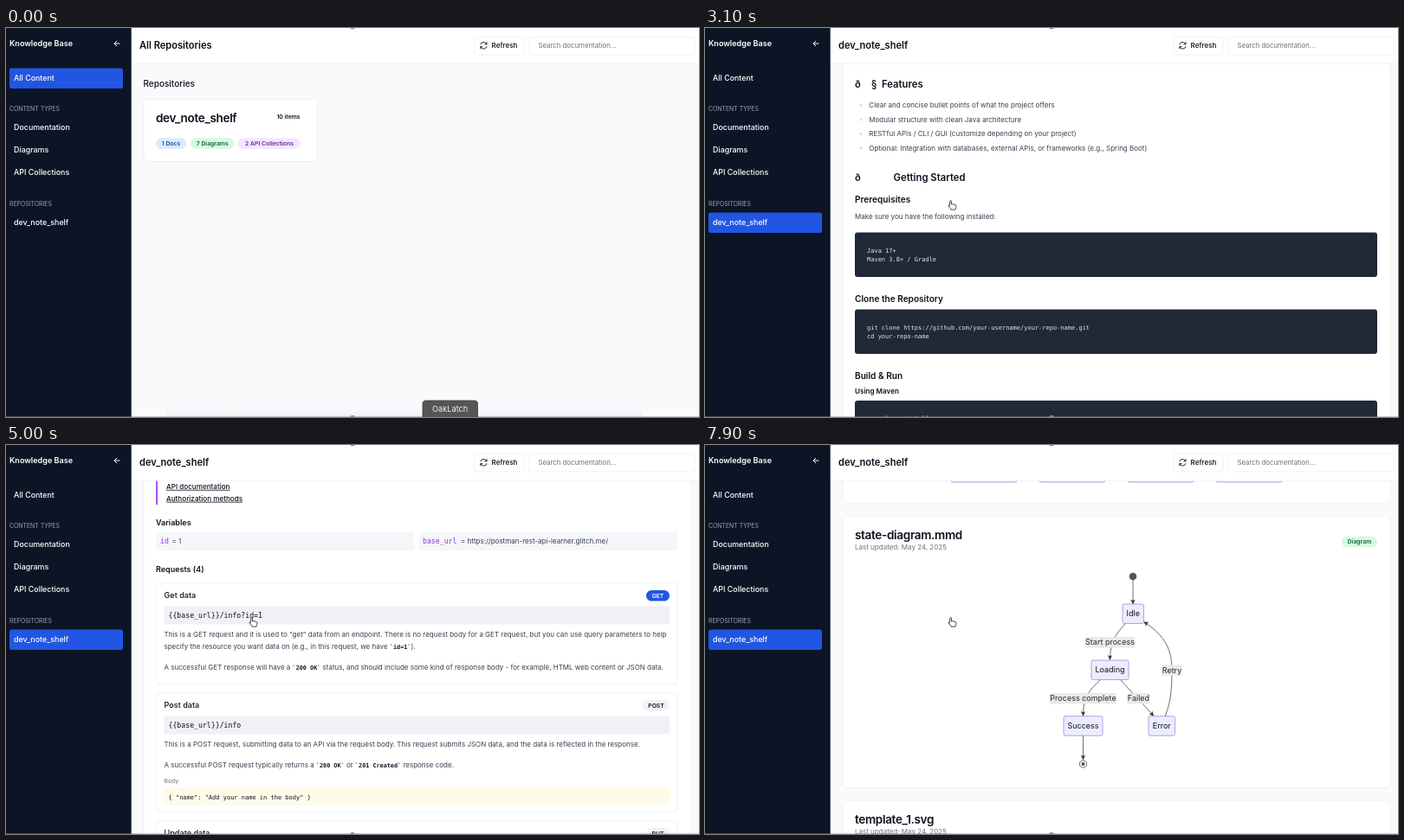
These frames come from a looping animation (800 px wide and 450 px high, 8000 ms). An HTML page:

```html
<!DOCTYPE html>
<html lang="en">
<head>
<meta charset="utf-8">
<title>Knowledge Base</title>
<style>
html, body { margin: 0; width: 100%; height: 100%; overflow: hidden; background: #f9fafb; }
svg { display: block; width: 800px; height: 450px; }
text { font-family: Inter, "Open Sans", sans-serif; }
.m, .c { font-family: "DejaVu Sans Mono", monospace; }
.c { font-size: 6.8px; font-weight: 700; fill: #111827; }
.edge { fill: none; stroke: #4a4a4a; stroke-width: .8; marker-end: url(#tip); }
</style>
</head>
<body>
<svg id="stage" viewBox="0 0 800 450" xmlns="http://www.w3.org/2000/svg">
  <defs>
    <marker id="tip" viewBox="0 0 6 6" refX="5.5" refY="3" markerWidth="6" markerHeight="6" markerUnits="userSpaceOnUse" orient="auto">
      <path d="M0 .4L6 3L0 5.6L1.4 3Z" fill="#333"/>
    </marker>
    <linearGradient id="glow" x2="0" y2="1">
      <stop offset="0" stop-color="#eceff4" stop-opacity="0"/>
      <stop offset="1" stop-color="#eceff4"/>
    </linearGradient>
  </defs>
  <rect width="800" height="450" fill="#f9fafb"/>
  <g id="shell">
    <g id="home"></g>
    <g id="page"></g>
    <g id="chrome"></g>
  </g>
  <g id="handles" fill="#8a8a8a">
    <ellipse cx="400" cy="0" rx="2.6" ry="1.2"/>
    <ellipse cx="400" cy="450" rx="2.6" ry="2"/>
    <rect y="449.3" width="800" height=".7" opacity=".6"/>
  </g>
  <g id="tooltip">
    <rect x="481" y="431" width="63.5" height="24" rx="3.5" fill="#555" stroke="#3e3e3e" stroke-width=".8"/>
    <text x="512.7" y="443.6" font-size="9.2" fill="#f0f0f0" text-anchor="middle">OakLatch</text>
  </g>
  <path id="arrow" d="M0 0V9.6L2.2 7.6L3.7 11L5.2 10.3L3.8 7.1H6.7Z" fill="#000" stroke="#fff" stroke-width=".7"/>
  <path id="hand" d="M.2 1.2C.2 -.3 2 -.3 2 1.2V4.4C2.4 3.6 3.8 3.8 3.9 4.7C4.4 4 5.6 4.3 5.6 5.1C6.3 4.6 7.3 5 7.3 6V8C7.3 9 6.6 9.4 6.5 10.6H1.6C1.3 9.2 -.6 7.8 -1.3 6.5C-1.8 5.4 -.6 4.9 .2 6Z" fill="#fff" stroke="#1a1a1a" stroke-width=".8" stroke-linejoin="round"/>
</svg>
<script>
const $ = id => document.getElementById(id);
const INK = '#0c111d', SOFT = '#374151', MUTED = '#6b7280', LINE = '#eceef1', PAPER = '#fff';
const NAVY = '#0c1526', ACCENT = '#2256e2', FIELD = '#eff1f4', VIOLET = '#9333ea';
const DOCS = ['#dbeafe', '#1e40af'], GRAPH = ['#d6fae2', '#166534'], API = ['#f3e8ff', '#6b21a8'];
const REPO = 'dev_note_shelf', STAMP = 'Last updated: May 24, 2025';

let out = '', top0 = 0;
const add = s => { out += s; };
const flush = id => { $(id).innerHTML = out; out = ''; top0 = 0; };

// y is the middle of the capitals
const text = (x, y, s, size = 8, fill = SOFT, weight = 400, more = '') =>
  add(`<text x="${x}" y="${y + top0 + size * .36}" font-size="${size}" fill="${fill}" font-weight="${weight}" ${more}>${s}</text>`);
const mono = (x, y, s, size = 7, fill = '#e5e7eb') => text(x, y, s, size, fill, 400, 'class="m"');
const box = (x, y, w, h, fill, r = 3, stroke = 'none') =>
  add(`<rect x="${x}" y="${y + top0}" width="${w}" height="${h}" rx="${r}" fill="${fill}" stroke="${stroke}" stroke-width=".8"/>`);
const dot = (x, y, r, fill, stroke = 'none') =>
  add(`<circle cx="${x}" cy="${y + top0}" r="${r}" fill="${fill}" stroke="${stroke}" stroke-width=".8"/>`);
const path = (d, attrs) => add(`<path d="${d}" transform="translate(0 ${top0})" ${attrs}/>`);
const pill = (x, y, w, s, [fill, ink]) => {
  box(x, y - 6.3, w, 12.6, fill, 6.3);
  text(x + w / 2, y, s, 6.8, ink, 600, 'text-anchor="middle"');
};
const bigTitle = (x, y, s) => text(x, y, s, 13.55, INK, 600, 'letter-spacing="-.34"');
const h2 = (y, ...parts) => parts.forEach(([x, s]) => text(x, y, s, 11.3, INK, 600));
const h3 = (y, s) => text(173, y, s, 10.1, INK, 600);
const h4 = (y, s) => text(173, y, s, 8.1, INK, 600);
const card = (y, h, title) => {
  box(159, y, 632, h, PAPER, 5, LINE);
  bigTitle(173, y + 22, title);
  text(173, y + 36.5, STAMP, 8, MUTED);
};
const code = (y, h, ...lines) => {
  box(173, y, 603, h, '#1f2937');
  lines.forEach((s, i) => mono(187, y + 20.5 + i * 10.6, s));
};
const list = (y, ...items) => items.forEach((s, i) => {
  dot(180, y + i * 16.4, 1, 'none', '#c3c8d0');
  text(189.3, y + i * 16.4, s);
});

function drawHome() {
  text(158.5, 64, 'Repositories', 10, INK, 500);
  add('<g id="tile">');
  box(159, 82.5, 200.5, 72, PAPER, 5, LINE);
  bigTitle(173, 104, REPO);
  text(326, 103, '10 items', 6.8, INK, 600, 'text-anchor="middle"');
  pill(173, 133.5, 35, '1 Docs', DOCS);
  pill(213, 133.5, 50.5, '7 Diagrams', GRAPH);
  pill(268, 133.5, 72, '2 API Collections', API);
  add('</g><rect x="185" y="440" width="550" height="10" fill="url(#glow)"/>');
  flush('home');
}

function drawReadme() {
  box(159, 49, 632, 1144, PAPER, 5, LINE);
  bigTitle(173, 71, 'README.md');
  text(173, 85.5, STAMP, 8, MUTED);
  pill(717, 79, 59, 'Documentation', DOCS);
  text(173, 126, 'Project Name', 13.55, INK, 700);
  text(173, 152, 'A short description of the project and the problem it solves.');

  top0 = 140;
  h2(65, [173, 'ð'], [192, '§'], [204, 'Features']);
  list(89.5, 'Clear and concise bullet points of what the project offers',
    'Modular structure with clean Java architecture',
    'RESTful APIs / CLI / GUI (customize depending on your project)',
    'Optional: Integration with databases, external APIs, or frameworks (e.g., Spring Boot)');
  h2(172.5, [173, 'ð'], [217.5, 'Getting Started']);
  h3(198.5, 'Prerequisites');
  text(173, 218, 'Make sure you have the following installed:');
  code(236.5, 51.5, 'Java 17+', 'Maven 3.8+ / Gradle');
  h3(313, 'Clone the Repository');
  code(325.5, 51.5, 'git clone https://github.com/your-username/your-repo-name.git', 'cd your-repo-name');
  h3(402, 'Build &amp; Run');
  h4(420.5, 'Using Maven');
  code(431, 51.5, 'mvn clean install', 'mvn spring-boot:run');

  top0 = 593;
  h4(48, 'Using Gradle');
  code(58.5, 51, './gradlew build', './gradlew bootRun');
  h2(137, [173, 'ð'], [192, '§ª'], [206, 'Running Tests']);
  code(154.5, 62, 'mvn test', '# or', './gradlew test');
  h2(244, [173, 'ð'], [214, 'ï¸'], [238, 'Project Structure']);
  code(261, 83, 'src/');
  const marks = (y, ...xs) => xs.forEach(x => mono(x, y, 'â'));
  const row = (y, x, name, cx, note) => { mono(x, y, name); if (note) mono(cx, y, note); };
  marks(292, 187, 205, 224); row(292, 246, 'main/');
  marks(303, 187, 218, 236, 255); row(303, 277, 'java/', 344, '# Source code');
  marks(313.4, 187, 218, 236, 255); row(313.4, 277, 'resources/', 344, '# Configuration and static files');
  marks(324, 187, 205, 224); row(324, 246, 'test/', 330, '# Unit and integration tests');
  h2(371.5, [173, 'ð'], [203, '¦'], [209, 'Dependencies']);
  list(396, 'Java 17+', 'Spring Boot (if applicable)', 'JUnit 5', 'Maven / Gradle');
  h2(482, [173, 'ð'], [209, 'Contributing']);
  text(173, 505, 'Pull requests are welcome. Please open an issue first to discuss what you would like to change.');
  h2(540, [173, 'ð'], [209, 'License']);
  text(173, 563, 'This project is licensed under the MIT License.');
}

const tick = s => `<tspan class="c">\`${s}\`</tspan>`;
const VERB_WIDTH = { GET: 27, PUT: 27, POST: 31, DELETE: 38 };
function request(y, h, verb, name, url, lines, body) {
  box(173, y, 602, h, PAPER, 4, LINE);
  text(182.5, y + 14, name, 9.1, INK, 500);
  const w = VERB_WIDTH[verb];
  pill(766 - w, y + 14.3, w, verb, verb === 'GET' ? [ACCENT, '#fff'] : ['#f1f3f6', INK]);
  box(182.5, y + 26.5, 583.5, 21, FIELD, 2);
  mono(187.5, y + 36.8, url, 8.2, INK);
  lines.forEach(([dy, s]) => text(182.5, y + dy, s));
  if (!body) return;
  text(182.5, y + 102, 'Body:', 6.8, MUTED);
  box(182.5, y + 109.5, 583.5, 20.5, '#fefce8', 2);
  mono(187.5, y + 120, body, 7, INK);
}
function variables(y, value) {
  text(173, y, 'Variables', 9, INK, 600);
  box(173, y + 11.5, 298, 21, '#f5f6f9', 2);
  box(477, y + 11.5, 298, 21, '#f5f6f9', 2);
  mono(178, y + 22, 'id', 8.2, VIOLET);
  text(191.5, y + 22, '= 1');
  mono(481, y + 22, 'base_url', 8.2, VIOLET);
  text(525, y + 22, '= ' + value);
}

function drawCollections() {
  const host = 'https://postman-rest-api-learner.glitch.me/';
  const body = '{ "name": "Add your name in the body" }';
  top0 = 1437;
  card(-230, 924, 'REST API basics');
  pill(712, -200, 64, 'API Collection', API);
  h2(-162, [173, 'Get started here']);
  text(173, -140, 'This template guides you through CRUD operations (GET, POST, PUT, DELETE), variables, and tests.');
  h2(-108, [173, 'How to use this template']);
  h3(-84, 'Step 1: Send requests');
  text(173, -66, 'RESTful APIs allow you to perform CRUD operations using the POST, GET, PUT, and DELETE HTTP methods.');
  h3(-40, 'Step 2: View responses');
  text(173, -22, 'Observe the response tab for status code, response time, and size.');
  box(173, 8, 2.2, 61, '#a855f7', 0);
  text(185, 19, 'Resources', 8, INK, 600);
  ['Building requests', 'API documentation', 'Authorization methods'].forEach((s, i) =>
    text(185, 34 + i * 13.9, s, 8.1, INK, 500, 'text-decoration="underline"'));
  variables(89.5, host);
  text(173, 144, 'Requests (4)', 9, INK, 600);
  request(160, 117, 'GET', 'Get data', '{{base_url}}/info?id=1', [
    [59, 'This is a GET request and it is used to "get" data from an endpoint. There is no request body for a GET request, but you can use query parameters to help'],
    [73, `specify the resource you want data on (e.g., in this request, we have ${tick('id=1')}).`],
    [97, `A successful GET response will have a ${tick('200 OK')} status, and should include some kind of response body - for example, HTML web content or JSON data.`]]);
  request(287, 137, 'POST', 'Post data', '{{base_url}}/info', [
    [59.5, 'This is a POST request, submitting data to an API via the request body. This request submits JSON data, and the data is reflected in the response.'],
    [83, `A successful POST request typically returns a ${tick('200 OK')} or ${tick('201 Created')} response code.`]], body);
  request(435, 137, 'PUT', 'Update data', '{{base_url}}/info?id=1', [
    [59.5, 'This is a PUT request and it is used to overwrite an existing piece of data.'],
    [83, `A successful PUT request typically returns a ${tick('200 OK')} or ${tick('201 Created')} response code.`]], body);
  request(583, 97, 'DELETE', 'Delete data', '{{base_url}}/info?id=1', [
    [59.5, 'This is a DELETE request, and it is used to delete data that was previously created.'],
    [83, `A successful DELETE request typically returns a ${tick('200 OK')} response code.`]]);

  card(708, 292, 'Sample API');
  pill(712, 738, 64, 'API Collection', API);
  variables(780, host);
  text(173, 836, 'Requests (1)', 9, INK, 600);
  request(852, 117, 'GET', 'Get data', '{{base_url}}/info?id=1', [
    [59, 'This is a GET request and it is used to "get" data from an endpoint.'],
    [83, `A successful GET response will have a ${tick('200 OK')} status.`]]);
}

const node = (x, y, w, h, s) => {
  box(x, y, w, h, '#ececff', 2, '#a58adf');
  text(x + w / 2, y + h / 2, s, 9, INK, 400, 'text-anchor="middle"');
};
const label = (x, y, w, s) => {
  box(x - w / 2, y - 6, w, 12.5, '#e9e9eb', 0);
  text(x, y, s, 9, '#2c2c2c', 400, 'text-anchor="middle"');
};
const edge = d => path(d, 'class="edge"');

function drawDiagrams() {
  top0 = 2713;
  card(-262, 330, 'sequence-diagram.mmd');
  pill(735, -232, 41, 'Diagram', GRAPH);
  ['User', 'Client', 'Server', 'Database'].forEach((s, i) => {
    const x = 284 + i * 102;
    path(`M${x + 38} -180V16`, 'stroke="#8c8c8c" stroke-width=".6"');
    node(x, -208, 76, 28, s);
    node(x, 15, 76, 28, s);
  });
  [[322, 424, 'Request'], [424, 526, 'Send'], [526, 628, 'Query'], [628, 526, 'Rows'], [526, 424, 'Reply'], [424, 322, 'Show']]
    .forEach(([a, b, s], i) => {
      const y = -150 + i * 28;
      text((a + b) / 2, y - 7, s, 8, INK, 400, 'text-anchor="middle"');
      edge(`M${a} ${y}H${b}`);
    });

  card(82, 314.5, 'state-diagram.mmd');
  pill(735, 112, 41, 'Diagram', GRAPH);
  edge('M494 156V184');
  edge('M485 207C474 219 467.5 228 467.5 248.5');
  edge('M457 271C443 284 436.5 292 436.5 313.5');
  edge('M479 271C491 284 505 299 518 313.5');
  edge('M531 314C538 298 539 280 539 260C539 232 527 218 506.5 204.5');
  edge('M436.5 336V364');
  dot(494, 152, 4.3, '#555');
  node(482, 184, 24.5, 22.5, 'Idle');
  node(446, 249, 43, 22.5, 'Loading');
  node(414, 313.7, 45, 22.5, 'Success');
  node(512, 313.7, 30.5, 22.5, 'Error');
  label(467.5, 228, 58, 'Start process');
  label(436.5, 293, 77, 'Process complete');
  label(500.5, 293, 26, 'Failed');
  label(539, 260.3, 23, 'Retry');
  dot(436.5, 369, 4.2, '#f4f4f6', '#4a4a4a');
  dot(436.5, 369, 2, '#555');

  for (let i = 0; i < 5; i++) {
    top0 = 3124 + i * 201.5;
    card(0, 188, `template_${i + 1}.svg`);
    if (i === 0) box(440, 85, 70, 45, '#00f', 0);
    if (i === 1) dot(475, 110, 24, '#f00');
    if (i === 2) path('M475 80L505 132H445Z', 'fill="#008000"');
    if (i === 3) {
      box(486.7, 86.5, 45, 25.5, '#008000', 0);
      path('M391 89.5L558.5 122.5', 'stroke="#f00" stroke-width="1.3"');
    }
    if (i === 4) dot(448.4, 133.5, 13, '#00f');
  }
}

function drawChrome() {
  add(`<rect x="144" y="-2" width="656" height="43" fill="${PAPER}"/>`);
  box(144, 41, 656, .6, LINE, 0);
  text(154, 20.5, '', 11.1, INK, 600, 'id="heading"');
  box(541, 10, 57, 21, PAPER, 3, LINE);
  path('M547.8 19.2A3.6 3.6 0 0 1 554.2 17.8L555 18.8M555 16.2V18.8H552.4M555 21.2A3.6 3.6 0 0 1 548.6 22.6L547.8 21.6M547.8 24.2V21.6H550.4',
    `fill="none" stroke="${INK}" stroke-width=".9"`);
  text(560.5, 20.5, 'Refresh', 8.1, INK, 500);
  box(604, 10, 191, 21, PAPER, 3, LINE);
  text(614.5, 20.5, 'Search documentation...', 7.8, MUTED);

  add(`<rect y="-2" width="144.7" height="454" fill="${NAVY}"/>`);
  text(4, 18, 'Knowledge Base', 9.05, '#fff', 600);
  path('M131.5 18H125M128 15L125 18L128 21', 'fill="none" stroke="#fff" stroke-width="1"');
  add(`<rect id="chosen" x="4" width="131" height="23.5" rx="2.5" fill="${ACCENT}"/>`);
  text(4, 93.5, 'CONTENT TYPES', 6.9, '#9ca3af');
  text(4, 204, 'REPOSITORIES', 6.9, '#9ca3af');
  [[58, 'All Content'], [114.7, 'Documentation'], [140.5, 'Diagrams'], [166.3, 'API Collections'], [225, REPO]]
    .forEach(([y, s]) => text(9, y, s, 8.9, '#fff', 500));
  flush('chrome');
}

drawHome();
drawReadme();
drawCollections();
drawDiagrams();
flush('page');
drawChrome();

// [time, value...] stops with straight runs between them
function track(stops, t) {
  const i = stops.findIndex(s => s[0] > t);
  if (i === 0) return stops[0].slice(1);
  if (i < 0) return stops[stops.length - 1].slice(1);
  const a = stops[i - 1], b = stops[i], k = (t - a[0]) / (b[0] - a[0]);
  return a.slice(1).map((v, n) => v + (b[n + 1] - v) * k);
}
const scroll = [[2600, 0], [2800, 25], [3100, 140], [3600, 593], [4000, 900], [4400, 1220], [4800, 1425], [5000, 1437],
  [5300, 1700], [5900, 3100], [6200, 3600], [6400, 3678.5], [6900, 3678.5], [7100, 3560], [7600, 2900], [7900, 2713]];
const pointer = [[400, 508, 452], [900, 262, 165], [1200, 233.5, 135.5], [1600, 233.5, 135.5], [2000, 262, 146], [2400, 282.5, 199.5]];
const OPEN = 2000;
const show = (id, on) => $(id).setAttribute('visibility', on ? 'visible' : 'hidden');
const move = (id, x, y) => $(id).setAttribute('transform', `translate(${x} ${y})`);

function draw(t) {
  const open = t >= OPEN;
  show('home', !open);
  show('page', open);
  show('tooltip', t < 500);
  show('arrow', t >= 500 && !open);
  show('hand', open);
  $('heading').textContent = open ? REPO : 'All Repositories';
  $('chosen').setAttribute('y', open ? 213.5 : 46.5);
  move('tile', 0, t >= 1000 ? -1 : 0);
  move('shell', 0, t >= 6400 && t < 6900 ? -1 : 0);
  move('page', 0, -track(scroll, t)[0]);
  const [x, y] = track(pointer, t);
  move('arrow', x, y);
  move('hand', x, y);
}

const start = performance.now();
function loop() {
  const t = (performance.now() - start) % 8000;
  draw(Math.floor(t / 100) * 100);
  requestAnimationFrame(loop);
}
loop();
</script>
</body>
</html>
```
